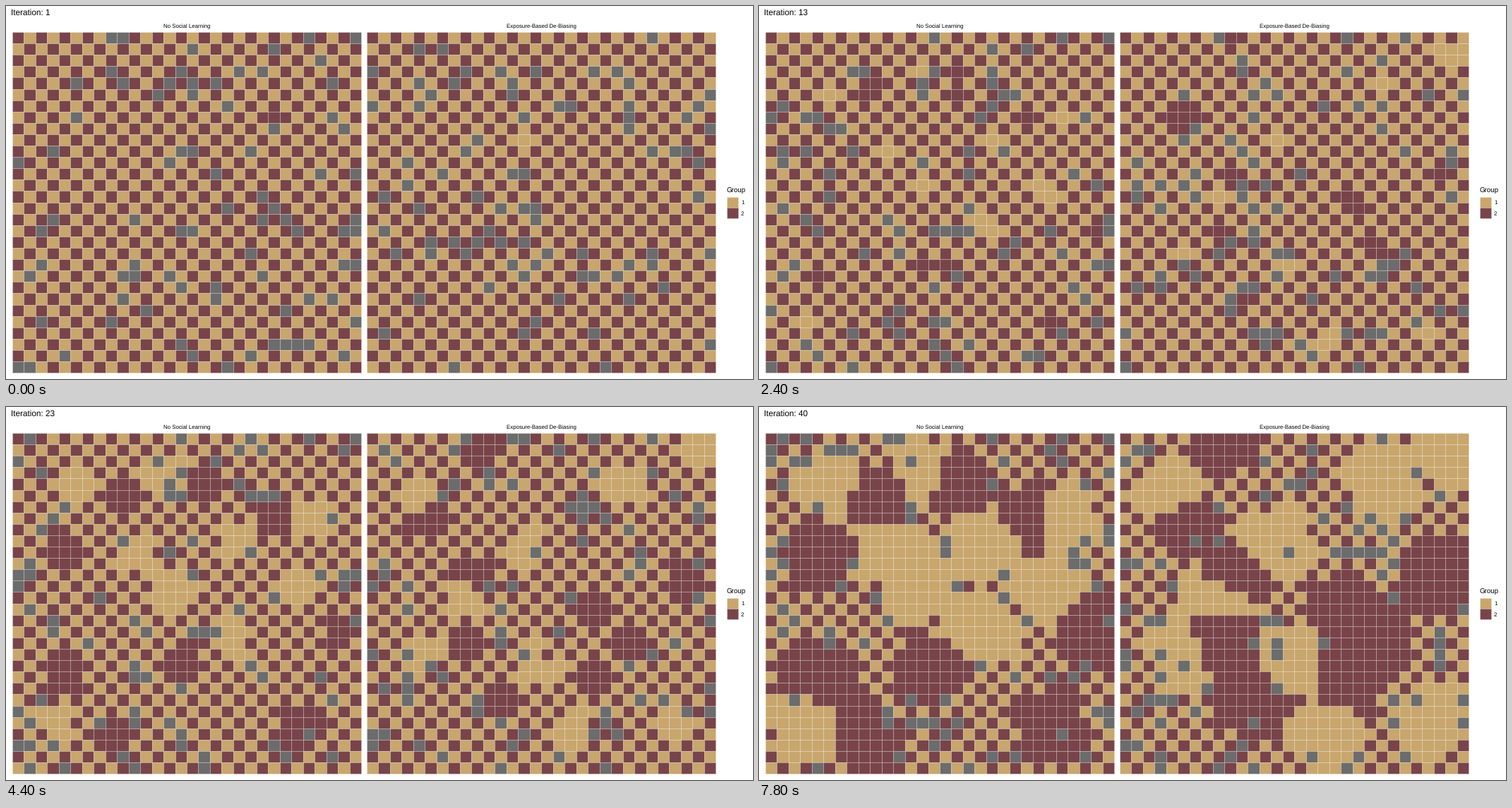
Write a matplotlib script that moves like this. It is 1058 px wide and 529 px high and loops after 8000 ms.

```python
import matplotlib.pyplot as plt
import numpy as np
from matplotlib.animation import FuncAnimation
from matplotlib.colors import ListedColormap
from matplotlib.patches import Rectangle

W, H, DPI = 1058, 529, 64
N, STEPS = 30, 40
VACANT, HOPS = 80, 7
TAN, MAROON, GAP = 0, 1, 2
COLORS = ["#c8a66d", "#784449", "#6c6c6c"]
EDGE = (1, 1, 1, 0.4)


def nearest(points):
    """Distance of every cell to the closest of the (column, row) points."""
    rows, cols = np.indices((N, N))
    return np.min([np.hypot(cols - c, rows - r) for c, r in points], axis=0)


def simulate(tan_cores, maroon_cores, seed):
    """Checkerboard that segregates around cores while vacancies hop about."""
    rng = np.random.default_rng(seed)
    rows, cols = np.indices((N, N))
    start = 1 - (rows + cols) % 2
    to_tan, to_maroon = nearest(tan_cores), nearest(maroon_cores)
    goal = np.where(to_tan < to_maroon, TAN, MAROON)
    due = 2 + 11 * np.minimum(to_tan, to_maroon) + rng.uniform(-4, 6, (N, N))

    gaps = rng.choice(N * N, VACANT, replace=False)
    states = []
    for step in range(1, STEPS + 1):
        if step > 1:
            mixed = np.flatnonzero(due > step)
            free = np.setdiff1d(mixed, gaps)
            movers = rng.choice(VACANT, HOPS, replace=False)
            gaps[movers] = rng.choice(free, HOPS, replace=False)
        grid = np.where(due <= step, goal, start)
        grid.flat[gaps] = GAP
        states.append(grid)
    return states


def pt(px):
    return px * 72 / DPI


plt.rcParams["font.family"] = "Liberation Sans"
plt.rcParams["text.hinting"] = "none"
fig = plt.figure(figsize=(W / DPI, H / DPI), dpi=DPI, facecolor="white")
ax = fig.add_axes([0, 0, 1, 1])
ax.axis("off")


def label(x, y, text, size, ha="left"):
    return ax.text(x, y, text, fontsize=pt(size), ha=ha, va="baseline", color="black")


def panel(x0, x1, name, states):
    label((x0 + x1) / 2, 31, name, 7.84, "center")
    mesh = ax.pcolormesh(
        np.linspace(x0, x1, N + 1), np.linspace(37, 520.2, N + 1), states[0],
        cmap=ListedColormap(COLORS), vmin=-0.5, vmax=2.5,
        edgecolors=EDGE, linewidth=pt(0.5), antialiased=True)
    return mesh, states


panels = [
    panel(8.8, 503.2, "No Social Learning", simulate(
        [(19, 9), (13, 13), (24, 13), (18, 17), (3, 25), (5, 4), (25, 7), (13, 3), (10, 10)],
        [(4, 10), (9, 5), (16, 4), (22, 7), (28, 17), (4, 21), (14, 20), (8, 26), (24, 25)],
        seed=4)),
    panel(511, 1005.4, "Exposure-Based De-Biasing", simulate(
        [(28, 1), (22, 4), (4, 5), (8, 14), (13, 9), (5, 19), (14, 20), (17, 26), (26, 25)],
        [(9, 0), (5, 7), (9, 12), (19, 15), (22, 18), (8, 18), (19, 21), (11, 23), (27, 12)],
        seed=9)),
]
ax.set_xlim(0, W)
ax.set_ylim(H, 0)

title = label(7, 13.2, "Iteration: 1", 11.8)
label(1021, 264.8, "Group", 9.8)
for i in (TAN, MAROON):
    y = 270.6 + 15.4 * i
    ax.add_patch(Rectangle((1021.3, y), 15.4, 15.4, facecolor=COLORS[i],
                           edgecolor=EDGE, linewidth=pt(0.5)))
    label(1041, y + 10.7, str(i + 1), 7.84)


def update(i):
    title.set_text(f"Iteration: {i + 1}")
    for mesh, states in panels:
        mesh.set_array(states[i])
    return [title] + [mesh for mesh, _ in panels]


anim = FuncAnimation(fig, update, frames=STEPS, interval=200, repeat=True,
                     repeat_delay=0, blit=False)
plt.show()
```
